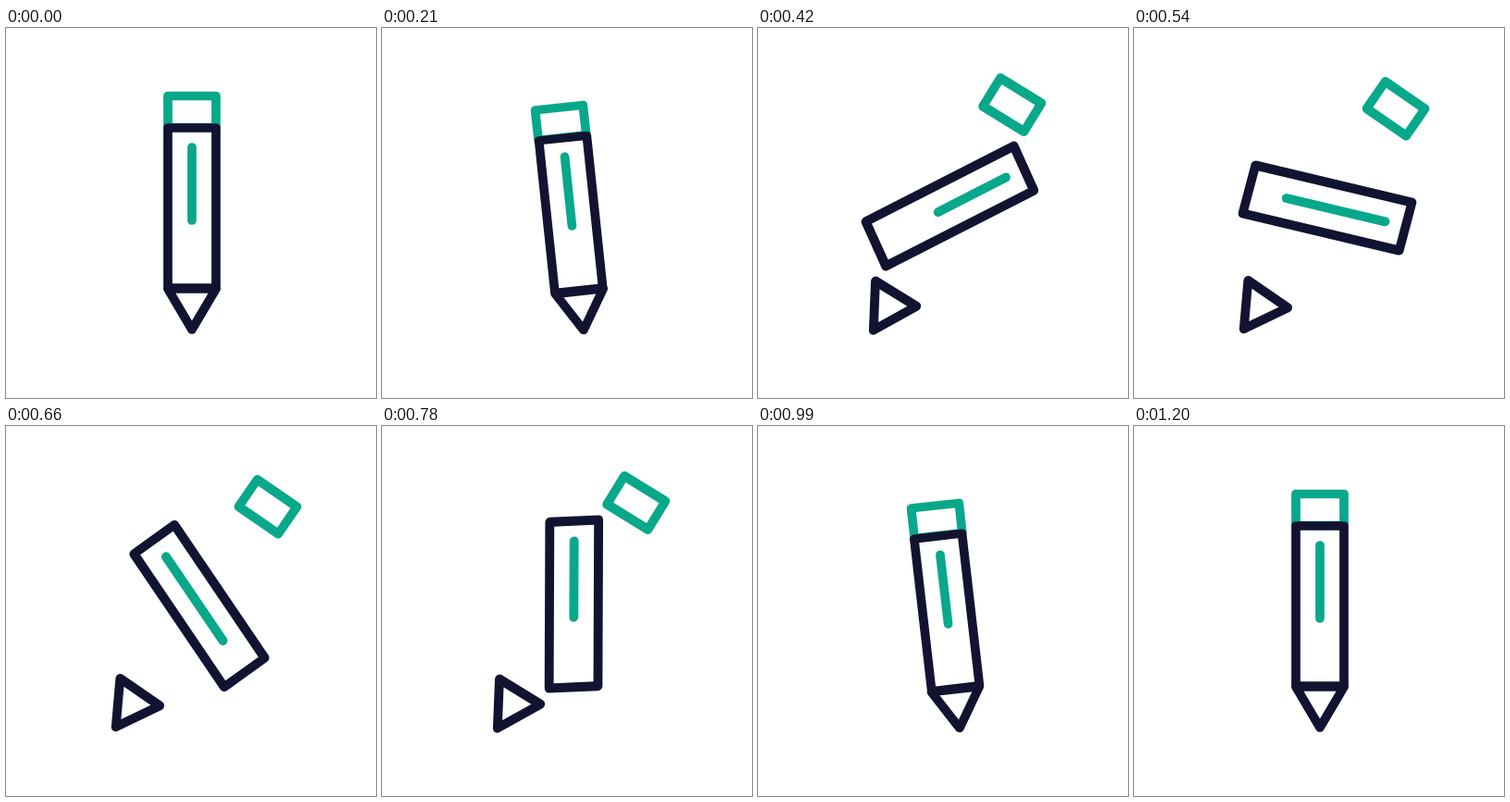
These frames come from a looping animation (400 by 400 pixels, 1.27 s). An HTML page:

```html
<!DOCTYPE html>
<html lang="en">
<head>
<meta charset="utf-8">
<title>Pencil</title>
<style>
  html, body { margin: 0; width: 100%; height: 100%; overflow: hidden; background: #fff; }
  svg { display: block; width: 100%; height: 100%; }
  g { fill: none; stroke-width: 9.7; stroke-linecap: round; stroke-linejoin: round; }
  .ink { stroke: #121331; }
  .mint { stroke: #08a88a; }
</style>
</head>
<body>
<svg viewBox="0 0 400 400">
  <g id="pencil">
    <path id="eraser" class="mint" d="M-26-121H26V-87H-26Z"/>
    <path id="tip" class="ink" d="M-26 87.5H26L0 131.5Z"/>
    <g id="body">
      <path id="line" class="mint"/>
      <path class="ink" d="M-26-86.5H26V86.5H-26Z"/>
    </g>
  </g>
</svg>
<script>
const LOOP = 1270, STEP = 30, SPAN = 1200;
const $ = id => document.getElementById(id);
const clamp = v => Math.min(1, Math.max(0, v));

// Pose keys for the first half; the second half mirrors them.
const times = [0, 200, 350, 420, 540, 600];
const pose = {
  x:     [201, 204, 206, 207.4, 209, 209.3],
  y:     [194.5, 201.5, 191, 192.5, 194.5, 195],
  angle: [0, -6.6, 24, 31.6, 34.6, 35.1],
  scale: [1, 0.956, 1.06, 1.054, 1.04, 1.037],
  gap:   [0, 0, 14, 18, 21.3, 22]
};

// Smooth curve through the keys that never overshoots them.
function track(keys, t) {
  const last = times.length - 1;
  const rate = i => (keys[i + 1] - keys[i]) / (times[i + 1] - times[i]);
  const slope = i => {
    if (i === 0 || i === last) return 0;
    const a = rate(i - 1), b = rate(i);
    return a * b > 0 ? 2 * a * b / (a + b) : 0;
  };
  let i = 0;
  while (i < last - 1 && t > times[i + 1]) i++;
  const d = times[i + 1] - times[i], s = (t - times[i]) / d, r = 1 - s;
  return r * r * (1 + 2 * s) * keys[i] + s * s * (3 - 2 * s) * keys[i + 1]
    + d * s * r * (r * slope(i) - s * slope(i + 1));
}

const sine = s => 0.5 - 0.5 * Math.cos(Math.PI * clamp(s));

// Cubic bezier (x1, 0, x2, 1), solved by bisection.
function ease(s, x1, x2) {
  s = clamp(s);
  let lo = 0, hi = 1;
  for (let n = 0; n < 24; n++) {
    const p = (lo + hi) / 2, q = 1 - p;
    if (3 * x1 * p * q * q + 3 * x2 * p * p * q + p * p * p < s) lo = p;
    else hi = p;
  }
  return lo * lo * (3 - 2 * lo);
}

const slide = t => ease((t - 410) / 310, 0.33, 0.3);

function draw(t) {
  const half = Math.min(t, SPAN - t);
  const at = name => track(pose[name], half);
  const gap = at('gap');
  $('pencil').setAttribute('transform',
    `translate(${at('x')} ${at('y')}) rotate(${at('angle')}) scale(1 ${at('scale')})`);
  $('eraser').setAttribute('transform', `translate(0 ${-gap})`);
  $('tip').setAttribute('transform', `translate(0 ${gap})`);
  $('body').setAttribute('transform', `rotate(${180 * sine((t - 190) / 820)})`);
  const top = -13.5 - 52 * slide(SPAN - t);
  const bottom = 13.5 + 52 * slide(t);
  $('line').setAttribute('d', `M0 ${top}V${bottom}`);
}

const start = performance.now();
function tick() {
  const t = (performance.now() - start) % LOOP;
  draw(Math.min(SPAN, Math.floor(t / STEP) * STEP));
  requestAnimationFrame(tick);
}
tick();
</script>
</body>
</html>
```
